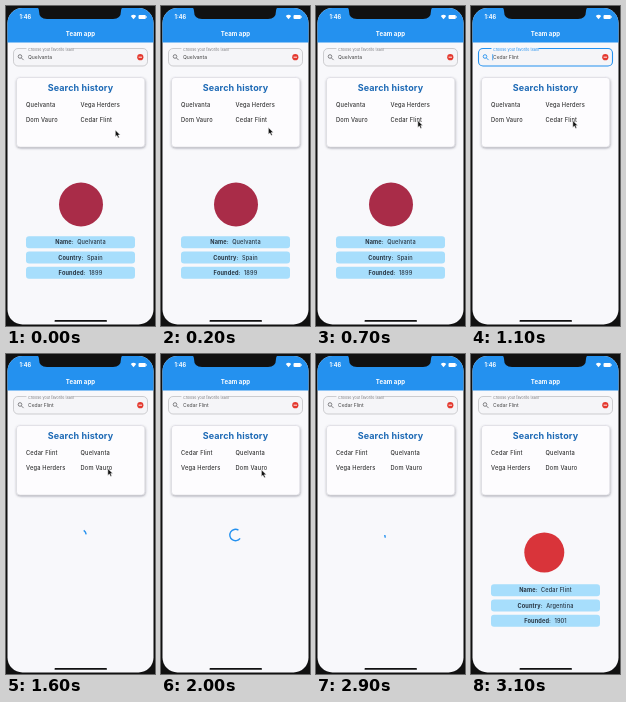
Animation, 149 px wide and 320 px high, one loop 3.9 s. Source, as an HTML page:

```html
<!DOCTYPE html>
<html lang="en">
<head>
<meta charset="utf-8">
<title>Team app</title>
<style>
  html, body { margin: 0; width: 100%; height: 100%; overflow: hidden; background: #111; }
  svg { display: block; width: 100%; height: 100%; }
  text { font-family: Inter, Roboto, sans-serif; white-space: pre; }
  .bold { font-weight: 700; }
  .entry { font-size: 5.7px; font-weight: 500; letter-spacing: .2px; fill: #333; }
  .row { font-size: 5.6px; font-weight: 500; letter-spacing: .15px; fill: #263340; text-anchor: middle; }
</style>
</head>
<body>
<svg viewBox="0 0 149 320">
  <defs>
    <clipPath id="screen"><rect x="1.5" y="2" width="146" height="316.5" rx="15"/></clipPath>
    <filter id="shadow" x="-10%" y="-10%" width="120%" height="125%">
      <feDropShadow dx="0.3" dy="1" stdDeviation="1.1" flood-color="#445" flood-opacity=".5"/>
    </filter>
  </defs>

  <g clip-path="url(#screen)">
    <rect width="149" height="320" fill="#f8f8fb"/>
    <rect width="149" height="36.5" fill="#2491ef"/>
    <path d="M30 0Q33 2 33 5Q33 13 41 13H107Q115 13 115 5Q115 2 118 0Z" fill="#111"/>
  </g>

  <g fill="#fff" class="bold">
    <text x="13.5" y="13.3" font-size="5.6">1:46</text>
    <text x="74.5" y="30" font-size="6" text-anchor="middle" letter-spacing=".1">Team app</text>
    <path d="M124.8 10Q127.5 7.6 130.2 10L127.5 13.2Z"/>
    <rect x="132.5" y="9" width="7.3" height="4" rx="1"/>
    <rect x="140.2" y="10.2" width=".7" height="1.6"/>
  </g>

  <g id="field">
    <rect id="outline" x="7.5" y="42.5" width="134" height="17.5" rx="4.5" fill="#f5f5f8"/>
    <rect x="20.5" y="41.5" width="47" height="2" fill="#f8f8fb"/>
    <text id="label" x="22" y="44.6" font-size="3.7">Choose your favorite team</text>
    <g id="lens" fill="none" stroke-width=".9"><circle cx="14" cy="50.5" r="1.8"/><path d="M15.4 51.9L17.6 54.1"/></g>
    <text id="query" x="22" y="53.2" font-size="5" fill="#444"></text>
    <path id="caret" d="M21.7 48.2V54.3" stroke="#2491ef" stroke-width=".8"/>
    <circle cx="134.3" cy="51.2" r="3.1" fill="#e4392f"/>
    <path d="M132.6 51.2H136" stroke="#fff" stroke-width=".9"/>
  </g>

  <rect x="10.5" y="71.5" width="128.3" height="69.5" rx="3.5" fill="#fdfcfe" stroke="#d3d3da" stroke-width=".5" filter="url(#shadow)"/>
  <text x="74.5" y="85" font-size="9" class="bold" fill="#1c69b5" text-anchor="middle" letter-spacing=".1">Search history</text>
  <g id="history"></g>

  <circle id="crest"/>
  <g id="rows"></g>
  <path id="spinner" fill="none" stroke="#2491ef" stroke-width="1.4"/>
  <path id="pointer" d="M0 0V6.8L1.6 5.4L2.8 8L4 7.4L2.9 5H5Z" fill="#111" stroke="#fff" stroke-width=".5"/>
  <rect x="48.5" y="314" width="52.5" height="1.8" rx=".9" fill="#111"/>
</svg>

<script>
const LOOP = 3900, STEP = 100;
const CLICK = 800, SUBMIT = 1300, REORDER = 1400, SPIN_START = 1450, LOADED = 3000, CREST = 3100, POINTER_GONE = 2600;
const $ = id => document.getElementById(id);
const show = (el, on) => el.setAttribute("visibility", on ? "visible" : "hidden");

const first = { name: "Quelvanta", country: "Spain", founded: 1899, crest: [75, 198.5, 22, "#a92c48"] };
const second = { name: "Cedar Flint", country: "Argentina", founded: 1901, crest: [73.3, 198.5, 20, "#d9343a"] };
const oldHistory = [first.name, "Vega Herders", "Dom Vauro", second.name];
const newHistory = [second.name, first.name, "Vega Herders", "Dom Vauro"];

$("history").innerHTML = oldHistory.map((_, i) =>
  `<text class="entry" x="${i % 2 ? 74.5 : 20}" y="${i < 2 ? 100.5 : 116}"></text>`).join("");
$("rows").innerHTML = ["Name", "Country", "Founded"].map((title, i) => {
  const y = 230.3 + i * 15.2;
  return `<rect x="20" y="${y}" width="109" height="12" rx="3" fill="#a7defc"/>
    <text class="row" x="74.5" y="${y + 8}"><tspan class="bold">${title}:</tspan>  <tspan class="value"></tspan></text>`;
}).join("");
const entries = [...$("history").children];
const values = [...document.querySelectorAll(".value")];

const clamp = x => Math.min(1, Math.max(0, x));
const smooth = x => { x = clamp(x); return x * x * (3 - 2 * x); };
const mix = (a, b, p) => a + (b - a) * p;
const blend = (a, b, p) => `rgb(${a.map((v, i) => Math.round(mix(v, b[i], p)))})`;

// Cubic easing through (.4, 0) and (.2, 1)
function fastOutSlowIn(x) {
  x = clamp(x);
  let lo = 0, hi = 1;
  for (let i = 0; i < 20; i++) {
    const u = (lo + hi) / 2;
    const at = 1.2 * u * (1 - u) ** 2 + .6 * u * u * (1 - u) + u ** 3;
    if (at < x) lo = u; else hi = u;
  }
  return 3 * lo * lo - 2 * lo ** 3;
}

function spinnerPath(t) {
  const phase = t / 1333 % 1, turn = t / 2222 % 1;
  const head = fastOutSlowIn(phase * 2), tail = fastOutSlowIn(phase * 2 - 1);
  const start = Math.PI * (-.5 + 1.5 * tail + 2 * turn + .5 * phase);
  const sweep = Math.max(1.5 * Math.PI * (head - tail), .001);
  const point = a => `${74.5 + 5.7 * Math.cos(a)} ${181 + 5.7 * Math.sin(a)}`;
  return `M${point(start)}A5.7 5.7 0 ${+(sweep > Math.PI)} 1 ${point(start + sweep)}`;
}

function drawField(t) {
  const focus = smooth((t - CLICK + STEP) / 200) * (1 - smooth((t - SUBMIT + STEP) / 200));
  const color = gray => blend([gray, gray, gray + 4], [36, 145, 239], focus);
  $("outline").setAttribute("stroke", color(176));
  $("outline").setAttribute("stroke-width", mix(.6, 1.1, focus));
  $("label").setAttribute("fill", color(125));
  $("lens").setAttribute("stroke", color(115));
  $("query").textContent = t < CLICK ? first.name : second.name;
  show($("caret"), t >= CLICK && t < SUBMIT);
}

function drawResult(t) {
  const team = t < CLICK ? first : second;
  [team.name, team.country, team.founded].forEach((v, i) => values[i].textContent = v);
  show($("rows"), t < CLICK || t >= LOADED);
  show($("crest"), t < CLICK || t >= CREST);
  ["cx", "cy", "r", "fill"].forEach((key, i) => $("crest").setAttribute(key, team.crest[i]));
}

function drawPointer(t) {
  const reach = smooth(t / 600), drift = smooth((t - 1800) / 500);
  const x = mix(109.3, 101.8, reach) - 4 * drift;
  const y = mix(124, 114.6, reach) + 3.3 * drift;
  $("pointer").setAttribute("transform", `translate(${x} ${y})`);
  show($("pointer"), t < POINTER_GONE);
}

function draw(now) {
  const t = Math.floor(now % LOOP / STEP) * STEP;
  const history = t < REORDER ? oldHistory : newHistory;
  entries.forEach((entry, i) => entry.textContent = history[i]);
  drawField(t);
  drawResult(t);
  drawPointer(t);
  const spinning = t >= SPIN_START && t < LOADED;
  show($("spinner"), spinning);
  if (spinning) $("spinner").setAttribute("d", spinnerPath(t - SPIN_START));
}

const begin = performance.now();
function tick() {
  draw(performance.now() - begin);
  requestAnimationFrame(tick);
}
tick();
</script>
</body>
</html>
```
